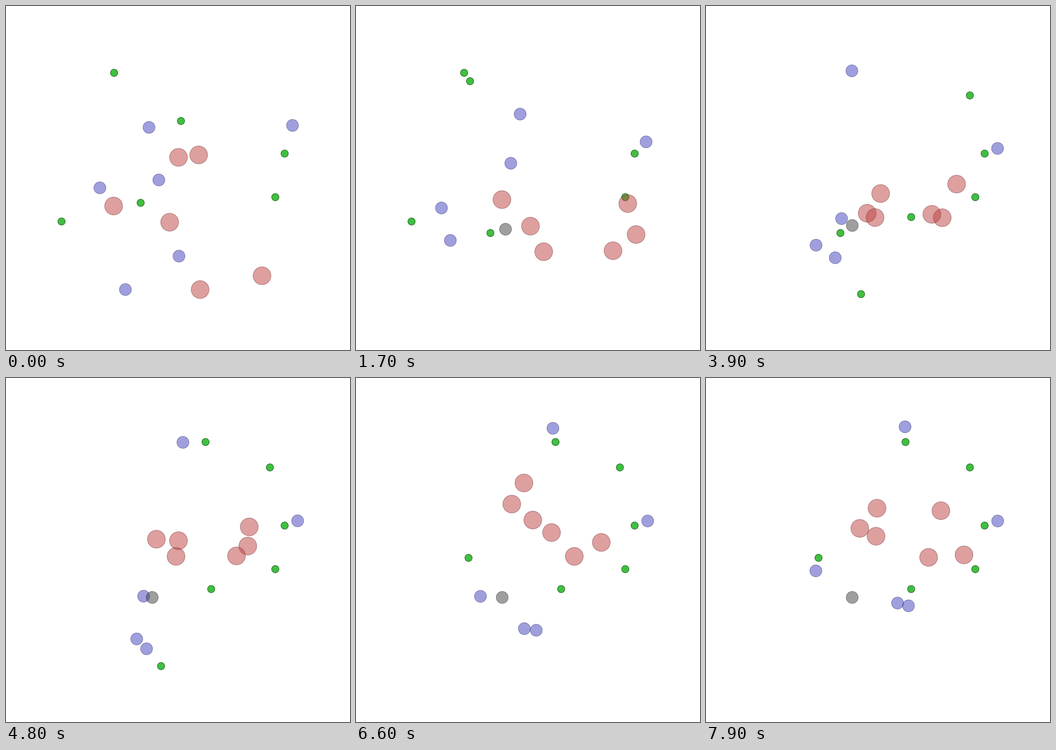
A matplotlib script for the animation above (8 s loop, 700 by 700 pixels).

```python
import numpy as np
import matplotlib.pyplot as plt
from matplotlib.animation import FuncAnimation
from matplotlib.patches import Circle

SIZE, FRAMES, INTERVAL = 700, 80, 100
RED, BLUE, GREEN, GRAY = (.75, .25, .25), (.25, .25, .75), (.25, .75, .25), (.25, .25, .25)
KEY_FRAMES = (0, 17, 30, 48, 59, 73, 79)
CATCH_FRAME = 12
clock = np.arange(FRAMES)[:, None]


def roam(points, via=()):
    """Smooth path through one point per key frame, at rest at both ends."""
    keys = sorted([(t, *p) for t, p in zip(KEY_FRAMES, points)] + list(via))
    t, p = np.split(np.array(keys, float), [1], axis=1)
    h = np.diff(t, axis=0)
    slope = np.diff(p, axis=0) / h
    v = np.zeros_like(p)
    v[1:-1] = (slope[:-1] * h[1:] + slope[1:] * h[:-1]) / (h[1:] + h[:-1])
    i = np.clip(np.searchsorted(t[:, 0], clock[:, 0], side="right") - 1, 0, len(h) - 1)
    u = np.clip((clock - t[i]) / h[i], 0, 1)
    ease = u * u * (3 - 2 * u)
    pull = h[i] * u * (1 - u) * ((1 - u) * v[i] - u * v[i + 1])
    return p[i] + (p[i + 1] - p[i]) * ease + pull


def settle(start, rest, begin=0, tau=4.7):
    """Critically damped move from rest at start to rest."""
    s = np.maximum(clock - begin, 0) / tau
    return np.array(start) + np.subtract(rest, start) * (1 - (1 + s) * np.exp(-s))


def forage(points, rest, via=()):
    """Roam between food, then settle beside the last piece."""
    begin = KEY_FRAMES[len(points) - 1]
    return np.where(clock < begin, roam(points, via), settle(points[-1], rest, begin))


def food(first, *moves):
    """Food stays put and jumps to its next place when eaten."""
    path = np.tile(np.array(first, float), (FRAMES, 1))
    for eaten, place in moves:
        path[eaten:] = place
    return path


foods = [
    food((220, 136), (32, (537, 182))),
    food((356, 234), (10, (232, 153)), (29, (417.5, 429.5))),
    food((567, 300.3)),
    food((548, 389)),
    food((274, 400.5), (7, (273.5, 462)), (47, (406, 130.3))),
    food((113, 438.5), (22, (315.5, 586.3)), (55, (229, 366))),
]
hunters = [roam(points) for points in (
    [(351, 308), (297, 394), (306, 450), (346, 363), (339, 284), (302, 262), (313, 306)],
    [(392, 303), (553, 402), (531, 418), (495, 303), (500, 296), (492, 343), (478, 270)],
    [(219, 407), (355, 448), (404, 415), (306, 328), (338, 219), (342, 238), (348, 265)],
    [(333, 440), (382, 500), (352, 513), (351, 331), (386, 267), (334, 321), (346, 322)],
    [(395, 577), (523, 498), (470, 507), (492, 342), (453, 293), (466, 415), (525, 360)],
    [(521, 549), (570, 465), (461, 467), (469, 362), (426, 285), (400, 358), (453, 365)],
)]
foragers = [
    settle((583, 243), (593.5, 291), tau=7),
    forage([(291, 247), (334, 220), (240, 149), (360, 131)], rest=(405.5, 99)),
    forage([(191, 370), (174, 411), (175, 447), (266, 531), (300, 557)], rest=(397, 450),
           via=[(22, 131, 438)]),
    forage([(311, 354), (315, 320), (279, 414), (280, 444), (280, 491)], rest=(219, 384.5)),
    forage([(243, 577), (192, 477), (240, 475), (286, 551), (326, 558)], rest=(419, 456)),
]
victim = settle((352, 509), (297.5, 446.5))

fig = plt.figure(figsize=(7, 7), dpi=100, facecolor="white")
ax = fig.add_axes([0, 0, 1, 1])
ax.set(xlim=(0, SIZE), ylim=(SIZE, 0))
ax.axis("off")


def paint(disc, color, alpha=.5):
    disc.set_facecolor((*color, alpha))
    disc.set_edgecolor((*(c / 2 for c in color), alpha))


def add_discs(paths, radius, color, alpha=.5):
    discs = [ax.add_patch(Circle((0, 0), radius, linewidth=.72)) for _ in paths]
    for disc in discs:
        paint(disc, color, alpha)
    return list(zip(discs, paths))


actors = (add_discs(foods, 7.4, GREEN, alpha=1)
          + add_discs(hunters, 18.2, RED)
          + add_discs(foragers + [victim], 12.2, BLUE))
victim_disc = actors[-1][0]


def draw(frame):
    for disc, path in actors:
        disc.center = path[frame]
    paint(victim_disc, GRAY if frame >= CATCH_FRAME else BLUE)
    return [disc for disc, _ in actors]


anim = FuncAnimation(fig, draw, frames=FRAMES, interval=INTERVAL, repeat=True, repeat_delay=0)
plt.show()
```
